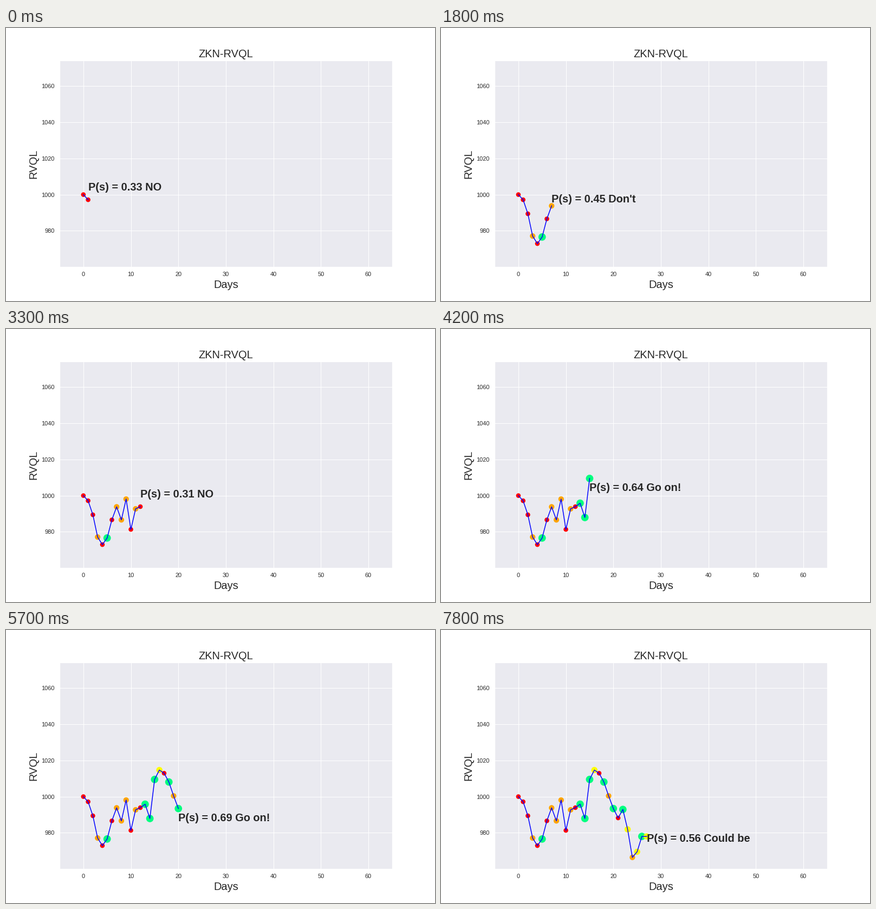
Recreate the animation shown at these times as a matplotlib script. Size 792 by 504 pixels, loop 8 s.

```python
from itertools import pairwise

import matplotlib.pyplot as plt
from matplotlib.animation import FuncAnimation

WIDTH, HEIGHT, DPI = 792, 504, 72
TICK_MS, LOOP_MS, DAY_MS = 100, 8000, 300
DAY_COUNT = 28

# signal: (colour, marker area, label offset, tenths of the chance, advice)
SIGNALS = {
    "n": ("red", 50, 5, 3, "NO"),
    "d": ("orange", 75, 2, 4, "Don't"),
    "c": ("yellow", 100, -3, 5, "Could be"),
    "g": ("springgreen", 150, -7, 6, "Go on!"),
}
SIGNAL_ORDER = "nnndngndddndngggcngdgngcdcgc"
HUNDREDTHS = "639128457"  # repeats every nine days

# The price eases in from each turning point to the next.
TURNS = {0: 1000, 3: 977.1, 4: 972.9, 6: 986.6, 7: 993.8, 8: 986.6, 9: 998.1,
         10: 981.3, 11: 992.7, 12: 993.9, 13: 995.8, 14: 987.9, 15: 1009.5,
         16: 1014.7, 19: 1000.4, 20: 993.4, 21: 988.2, 22: 992.9, 23: 981.9,
         24: 966.4, 26: 978}
EASE_POWER = 1.9


def price_on(day):
    for (start, low), (end, high) in pairwise(TURNS.items()):
        if day <= end:
            return low + (high - low) * ((day - start) / (end - start)) ** EASE_POWER
    return high


prices = [price_on(day) for day in range(DAY_COUNT)]
colors, sizes, offsets, tenths, advice = zip(*(SIGNALS[s] for s in SIGNAL_ORDER))

plt.rcParams.update({
    "font.family": "Liberation Sans",
    "text.color": "0.15",
    "axes.labelcolor": "0.15",
    "xtick.color": "0.15",
    "ytick.color": "0.15",
})

fig = plt.figure(figsize=(WIDTH / DPI, HEIGHT / DPI), dpi=DPI, facecolor="white")
fig.subplots_adjust(left=0.125, right=0.9, bottom=0.125, top=0.88)
ax = fig.add_subplot(facecolor="#EAEAF0")
ax.set(xlim=(-5, 65), ylim=(960.05, 1074),
       xticks=range(0, 61, 10), yticks=range(980, 1061, 20))
ax.set_axisbelow(True)
ax.grid(color="white", linewidth=1)
ax.tick_params(length=6, pad=3.5, labelsize=11, left=False, bottom=False)
for spine in ax.spines.values():
    spine.set(color="white", linewidth=1.25)
ax.set_title("ZKN-RVQL", fontsize=20)
ax.set_xlabel("Days", fontsize=20)
ax.set_ylabel("RVQL", fontsize=20, labelpad=5)

dots = ax.scatter(range(DAY_COUNT), prices, s=sizes, c=colors,
                  linewidths=1.5, zorder=1)
line, = ax.plot([], [], color="blue", linewidth=1.5, zorder=2)
label = ax.text(0, 0, "", fontsize=20, fontweight="bold", zorder=3)


def update(frame):
    day = 1 + frame * TICK_MS // DAY_MS
    shown = day + 1
    dots.set_offsets(list(zip(range(shown), prices)))
    dots.set_sizes(sizes[:shown])
    line.set_data(range(shown), prices[:shown])
    label.set_position((day, prices[day] + offsets[day]))
    hundredth = HUNDREDTHS[day % len(HUNDREDTHS)]
    label.set_text(f"P(s) = 0.{tenths[day]}{hundredth} {advice[day]}")
    return dots, line, label


animation = FuncAnimation(fig, update, frames=LOOP_MS // TICK_MS,
                          interval=TICK_MS, repeat=True, repeat_delay=0)
plt.show()
```
